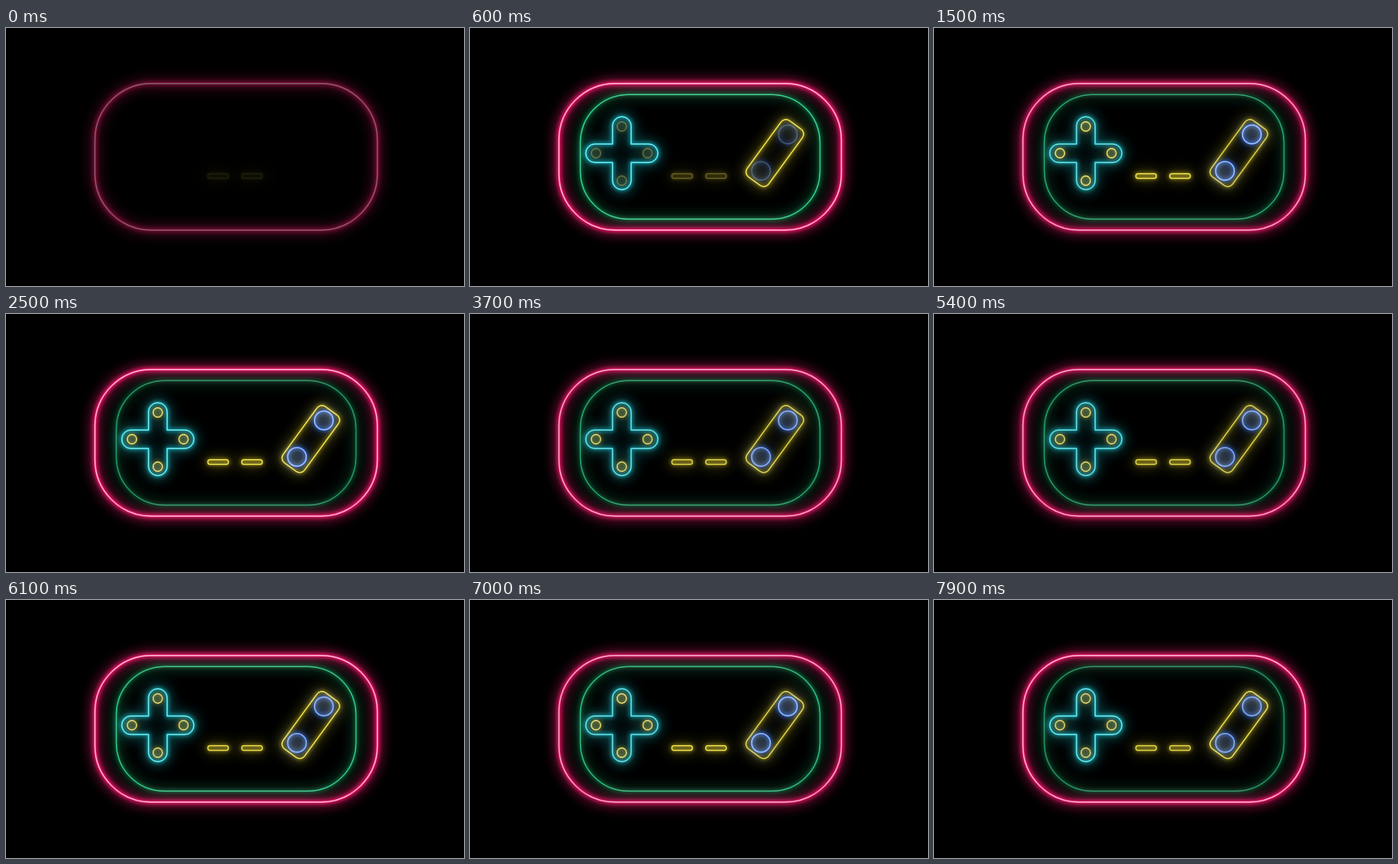
An HTML page for the animation above (8000 ms loop, 600 px wide and 338 px high).

```html
<!DOCTYPE html>
<html lang="en">
<head>
<meta charset="utf-8">
<title>Neon gamepad</title>
<style>
  html, body { margin: 0; width: 100%; height: 100%; overflow: hidden; background: #000; }
  svg { display: block; width: 100vw; height: 100vh; }
  .tube { mix-blend-mode: screen; }
</style>
</head>
<body>
<svg viewBox="0 0 600 338" fill="none" stroke-linejoin="round">
  <defs>
    <filter id="near" filterUnits="userSpaceOnUse" x="0" y="0" width="600" height="338" color-interpolation-filters="sRGB"><feGaussianBlur stdDeviation="2.4"/></filter>
    <filter id="far" filterUnits="userSpaceOnUse" x="0" y="0" width="600" height="338" color-interpolation-filters="sRGB"><feGaussianBlur stdDeviation="8"/></filter>
  </defs>
  <rect width="600" height="338" fill="#000"/>
  <g id="stage"></g>
</svg>
<script>
const LOOP = 8000, STEP = 100;
const stage = document.getElementById('stage');

function node(tag, attrs, parent) {
  const el = document.createElementNS('http://www.w3.org/2000/svg', tag);
  for (const key in attrs) el.setAttribute(key, attrs[key]);
  parent.appendChild(el);
  return el;
}

const rect = (x, y, width, height, rx, extra) => ['rect', { x, y, width, height, rx, ...extra }];
const circle = (cx, cy, r) => ['circle', { cx, cy, r }];

// Blurred copies of the tube under a coloured line and a lighter core.
// The tube hums around its steady level: brightest at `peak`, then every `period` ms.
function tube(shapes, { color, core, width, coreWidth, near, far, fill = 0, keys, hum }) {
  const group = node('g', { class: 'tube' }, stage);
  const layer = (attrs) => {
    const g = node('g', attrs, group);
    shapes.forEach(([tag, shape]) => node(tag, shape, g));
  };
  layer({ stroke: color, 'stroke-width': 12, opacity: far, filter: 'url(#far)' });
  layer({ stroke: color, 'stroke-width': width * 2.4, opacity: near, filter: 'url(#near)' });
  if (fill) layer({ fill: core, opacity: fill });
  layer({ stroke: color, 'stroke-width': width });
  layer({ stroke: core, 'stroke-width': coreWidth });
  return { group, keys, hum };
}

const lateKeys = [[0, 0], [100, 0], [600, 0.42], [1100, 1]];
const earlyKeys = [[0, 0], [100, 0], [500, 1]];
const tubes = [
  tube([rect(116.5, 72.7, 370, 192.1, 74)], {
    color: '#ff1a70', core: '#ffbcdc', width: 2.6, coreWidth: 1.4, near: 0.8, far: 0.5,
    keys: [[0, 0.5], [300, 1]], hum: { period: 1900, peak: 600, depth: 0.08 }
  }),
  tube([rect(144.5, 87.2, 314, 163.2, 63)], {
    color: '#1cb872', core: '#48d498', width: 1.6, coreWidth: 0.9, near: 0.5, far: 0.26,
    keys: earlyKeys, hum: { period: 1333, peak: 600, depth: 0.3 }
  }),
  tube([['path', {
    d: 'M186.7 152V128.5a12.2 12.2 0 0 1 24.4 0V152H234a12.1 12.1 0 0 1 0 24.2H211.1V199.5a12.2 12.2 0 0 1-24.4 0V176.2H163.8a12.1 12.1 0 0 1 0-24.2Z'
  }]], {
    color: '#14bccb', core: '#92f2f4', width: 2, coreWidth: 1, near: 0.65, far: 0.34,
    keys: earlyKeys, hum: { period: 1900, peak: 600, depth: 0.06 }
  }),
  tube([circle(198.8, 129, 6.1), circle(198.8, 200, 6.1), circle(165, 164, 6.1), circle(232.6, 164, 6.1)], {
    color: '#cdbb38', core: '#e6da6a', width: 1.6, coreWidth: 0.9, near: 0.4, far: 0.12, fill: 0.14,
    keys: lateKeys, hum: { period: 2100, peak: 2500, depth: 0.06 }
  }),
  tube([rect(264.4, 190.8, 27, 6.2, 3.1), rect(308.8, 190.8, 27, 6.2, 3.1)], {
    color: '#d4c424', core: '#f0e468', width: 1.7, coreWidth: 0.9, near: 0.5, far: 0.22, fill: 0.15,
    keys: [[0, 0.13], [600, 0.42], [1100, 1]], hum: { period: 2100, peak: 2500, depth: 0.08 }
  }),
  tube([rect(-45.6, -17.4, 91.2, 34.8, 8, { transform: 'translate(399.3 163.8) rotate(-53.9)' })], {
    color: '#d8c822', core: '#f0e468', width: 1.7, coreWidth: 0.9, near: 0.5, far: 0.26,
    keys: earlyKeys, hum: { period: 1900, peak: 600, depth: 0.1 }
  }),
  tube([circle(416.4, 139.4, 12.2), circle(381.2, 187.2, 12.2)], {
    color: '#3f78ec', core: '#a4c8ff', width: 2.2, coreWidth: 1.1, near: 0.6, far: 0.22, fill: 0.16,
    keys: lateKeys, hum: { period: 2100, peak: 2500, depth: 0.12 }
  })
];

function sample(keys, t) {
  for (let i = 1; i < keys.length; i++) {
    const [t0, v0] = keys[i - 1], [t1, v1] = keys[i];
    if (t <= t1) return v0 + (v1 - v0) * (t - t0) / (t1 - t0);
  }
  return keys[keys.length - 1][1];
}

function draw(t) {
  for (const { group, keys, hum } of tubes) {
    const wave = (Math.cos((t - hum.peak) / hum.period * 2 * Math.PI) - 1) / 2;
    const level = t < hum.peak ? 1 : 1 + hum.depth * wave;
    group.setAttribute('opacity', sample(keys, t) * level);
  }
}

const start = performance.now();
function tick() {
  const t = (performance.now() - start) % LOOP;
  draw(Math.floor(t / STEP) * STEP);
  requestAnimationFrame(tick);
}
tick();
</script>
</body>
</html>
```
